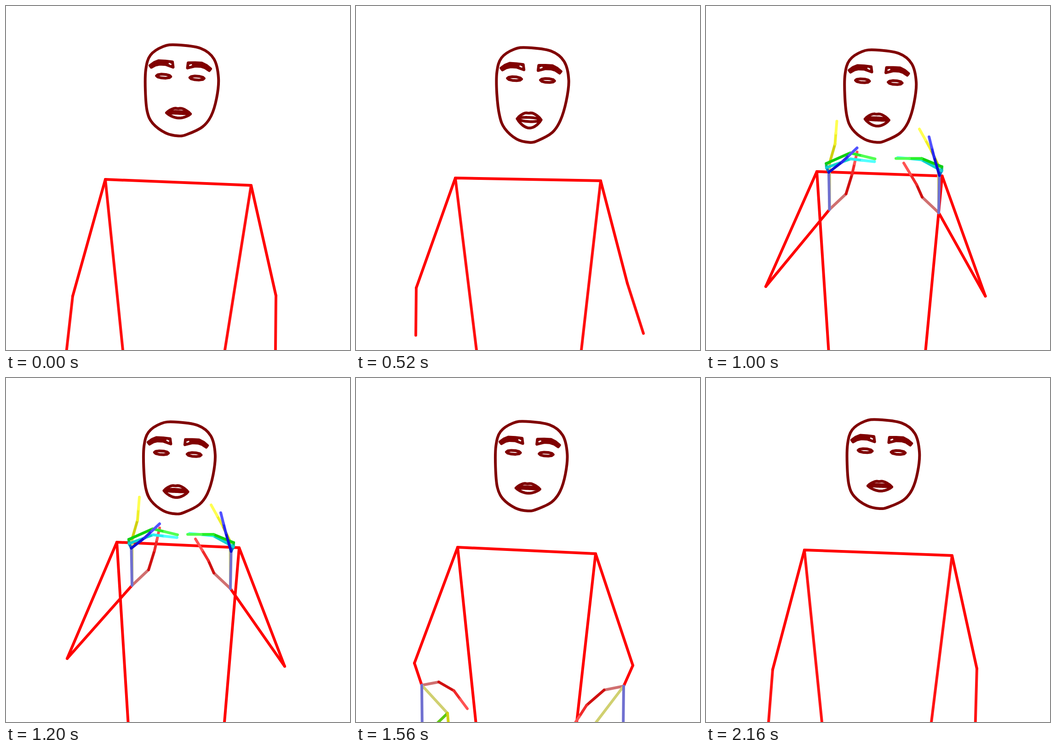
An HTML page for the animation above (2200 ms loop, 748 px wide and 748 px high).

```html
<!DOCTYPE html>
<html lang="en">
<head>
<meta charset="utf-8">
<title>Signing pose</title>
<style>
html, body { margin: 0; width: 100%; height: 100%; overflow: hidden; background: #fff; }
svg { display: block; width: 100vw; height: 100vh; }
path { fill: none; stroke-width: 6; stroke-linecap: round; stroke-linejoin: round; }
</style>
</head>
<body>
<svg id="stage" viewBox="0 0 748 748"></svg>
<script>
const LOOP = 2200, STEP = 40, HANDS_FROM = 640;
const DARK = '#800000';
const stage = document.getElementById('stage');

// Key poses. head: centre x, nod, chin drop, mouth opening.
// torso: left and right shoulder, x of both hip lines at the lower edge.
// arms: elbow and wrist, left then right. lowered: how far the hands hang.
// ease: exponent for the arms on the way to the next pose.
const poses = [
  { at: 0, ease: 3, head: [382.5, 0, 0, 0], torso: [216, 377, 533, 390, 254, 476],
    arms: [145, 631, 120, 852, 587, 630, 585, 852], lowered: 1, pale: 15 },
  { at: 520, ease: .9, head: [384, 6, 14, 1], torso: [216, 374, 532, 380, 262, 490],
    arms: [131, 613, 130, 716, 590, 603, 625, 712], lowered: 1, pale: 15 },
  { at: 800, ease: 1, head: [381.5, 11, 15, .5], torso: [241, 363, 520, 370, 267.5, 480],
    arms: [127, 610, 263, 434, 609, 635, 524, 441], lowered: 0, pale: 0 },
  { at: 1200, ease: 2, head: [377, 11, 13, .4], torso: [241, 357, 507, 369, 265.5, 475],
    arms: [133, 610, 274, 451, 606, 627, 488, 458], lowered: 0, pale: 0 },
  { at: 1560, ease: 1, head: [381.3, 10, 6.5, 0], torso: [221, 368, 521, 382, 260.5, 480],
    arms: [127, 620, 143, 668, 602, 625, 582, 670], lowered: 1, pale: 0 },
  { at: 1720, ease: 1, head: [384.5, 8, 3, 0], torso: [213, 372, 531, 388, 260.5, 490],
    arms: [119, 618, 110, 850, 598.5, 628, 607, 850], lowered: 1, pale: 5 },
  { at: 2160, ease: 1, head: [385.5, 6, 1.5, 0], torso: [214, 374, 535, 386, 252, 490],
    arms: [145, 634, 128, 850, 589, 632, 583, 850], lowered: 1, pale: 20 }
];

// Face at rest; the brow is one half, measured from the nose line.
const NOSE = 379, ROLL = .055;
const oval = [[371, 84.5], [423, 92], [452, 115], [462, 156], [458, 200], [446, 239],
  [427, 263], [394, 279], [375, 282.5], [347, 276], [319, 255], [307, 229], [303, 184],
  [304, 138], [314, 107], [342, 88]];
const brow = [[17, 122.5], [32, 121.5], [47, 121.5], [57, 126], [66, 133],
  [63, 137], [54, 131.5], [45, 129], [32, 129], [15.5, 134]];

// Hand points relative to the wrist, x towards the body; thumb to little finger.
const knuckles = {
  raised: [[36, -34], [.5, -102], [-7, -100], [-6.5, -91], [-1.5, -81]],
  lowered: [[37, -7], [56, 61], [28, 88], [14, 98], [1, 104]]
};
const leftHand = { side: 1, reach: 1, droop: 0, // bend and tip of each finger
  fingers: [[49, -76, 60, -125], [12, -142, 16, -192], [45, -123, 99, -110],
    [46, -110, 98, -104], [27, -103, 60, -134]] };
const rightHand = { side: -1, reach: 1.15, droop: .42,
  fingers: [[48, -61, 76, -108], [17, -137, 42, -182], [37, -118, 93, -118],
    [37, -115, 89, -120], [10, -121, 21, -165]] };

const mix = (a, b, k) => a + (b - a) * k;
const mixAll = (a, b, k) => a.map((v, i) => mix(v, b[i], k));
const clamp = v => Math.min(1, Math.max(0, v));
const range = (n, f) => Array.from({ length: n }, (_, i) => f(i));

function poseAt(t) {
  const i = poses.findLastIndex(p => p.at <= t);
  const a = poses[i], b = poses[i + 1] || a;
  const k = a === b ? 0 : (t - a.at) / (b.at - a.at), eased = k ** a.ease;
  return {
    head: mixAll(a.head, b.head, k),
    torso: mixAll(a.torso, b.torso, k),
    arms: mixAll(a.arms, b.arms, eased),
    lowered: mix(a.lowered, b.lowered, eased),
    pale: mix(a.pale, b.pale, k)
  };
}

const xy = p => p.map(v => v.toFixed(1)).join();
const line = points => 'M' + points.map(xy).join('L');
function smoothLoop(points) {
  const n = points.length, at = i => points[(i + n) % n];
  const handle = (i, s) => at(i).map((v, j) => v + s * (at(i + 1)[j] - at(i - 1)[j]) / 6);
  return 'M' + xy(at(0)) + range(n, i =>
    'C' + [handle(i, 1), handle(i + 1, -1), at(i + 1)].map(xy).join(' ')).join('') + 'Z';
}

function add(tag, attributes = {}, parent = stage) {
  const node = document.createElementNS(stage.namespaceURI, tag);
  for (const name in attributes) node.setAttribute(name, attributes[name]);
  return parent.appendChild(node);
}
const stroke = (color, parent) => add('path', { stroke: color }, parent);
const draw = (path, d) => path.setAttribute('d', d);

// Bones join joint 0 (the wrist) and joints 1 to 20, four to a finger.
function handBones() {
  const hues = ['100', '110', '010', '011', '001'];
  const tone = (f, on, off) => `rgb(${[...hues[f]].map(c => +c ? on : off)})`;
  const roots = [0, 1, 4].map(f => [0, 4 * f + 1, tone(f, 208, 112)]);
  const palm = [[5, 9, '#60c810'], [9, 13, '#10b870'], [13, 17, '#1070c0']];
  const fingers = [0, 1, 3, 2, 4].flatMap(f =>
    [[208, 16], [240, 42], [255, 82]].map(([on, off], i) =>
      [4 * f + 1 + i, 4 * f + 2 + i, tone(f, on, off)]));
  return [...roots, ...palm, ...fingers];
}
const bones = handBones();

const face = stroke(DARK), lips = stroke(DARK);
const sides = [-1, 1].map(side => ({
  side,
  eye: stroke(DARK),
  brow: add('path', { stroke: DARK, style: `fill:${DARK}` }),
  notch: add('path', { stroke: '#fff', style: 'stroke-width:3' })
}));
const hips = [stroke('#f00'), stroke('#f00')];
const forearms = [stroke('#f00'), stroke('#f00')];
const upperArms = stroke('#f00');
const hands = [leftHand, rightHand].map(shape => {
  const group = add('g');
  return { shape, group, paths: bones.map(b => stroke(b[2], group)) };
});

function drawFace([cx, nod, chin, open]) {
  const eyes = nod * .9, jaw = Math.max(0, chin - eyes);
  const scale = (159 - nod * .3) / 159; // a nodding head looks narrower
  const place = ([x, y]) => {
    const u = clamp((y - 155) / 127);
    const pull = 1 - jaw * .03 * u * u * (1 - u);
    const shift = y < 155 ? mix(nod, eyes, (y - 85) / 70) : mix(eyes, chin, u ** 1.6);
    return [cx + (x - 382.5) * scale * pull, y + shift];
  };
  draw(face, smoothLoop(oval.map(place)));

  for (const s of sides) {
    const half = points => points.map(([x, y]) =>
      place([NOSE + s.side * x, y + s.side * x * ROLL]));
    const lens = range(10, i => {
      const a = i * Math.PI / 5;
      return [36.3 + 15.5 * Math.cos(a), 154.6 + 4.2 * Math.sin(a)];
    });
    draw(s.eye, line(half(lens)) + 'Z');
    draw(s.brow, line(half(brow)) + 'Z');
    draw(s.notch, line(half([[20.5, 128], [24, 126.5]])));
  }

  const mouthY = 233.5 + nod * .15 + chin * .85;
  const arc = (height, power, dip = 0) => line(range(17, i => {
    const u = i / 16;
    const v = Math.sin(Math.PI * u) ** power - dip * Math.exp(-(((u - .48) / .09) ** 2));
    return [cx - 7.5 + 52 * (u - .5), mouthY + 2.5 * (u - .5) + height * v];
  }));
  draw(lips, arc(-12 - 3 * open, .8, .12) + arc(10 + 9 * open, .8) +
    arc(-4, .5) + arc(5 * open * open, .5));
}

function drawHand({ shape, group, paths }, [wx, wy], lowered, visible) {
  group.setAttribute('display', visible ? 'inline' : 'none');
  const { side, reach, droop, fingers } = shape;
  const joints = [[wx, wy]];
  fingers.forEach(([bx, by, tx, ty], f) => {
    const [hx, hy] = knuckles.lowered[f];
    const hang = f ? [hx, hy, hx + 3, hy + 35, hx + 4, hy + 75] : [hx, hy, 70, 12, 99, 51];
    const low = hang.map((v, i) => i % 2 ? v + droop * hang[i - 1] : v * reach);
    const [kx, ky, mx, my, ex, ey] =
      mixAll([...knuckles.raised[f], bx, by, tx, ty], low, lowered);
    for (const [x, y] of [[kx, ky], [mx, my], [mix(mx, ex, .48), mix(my, ey, .48)], [ex, ey]])
      joints.push([wx + side * x, wy + y]);
  });
  bones.forEach(([a, b], i) => draw(paths[i], line([joints[a], joints[b]])));
}

function render(time) {
  let t = Math.floor((time % LOOP) / STEP) * STEP;
  if (t === STEP) t = 0; // the opening pose holds for two steps

  const { head, torso, arms, lowered, pale } = poseAt(t);
  const [lx, ly, rx, ry, lh, rh] = torso;
  const shoulders = [[lx, ly], [rx, ry]];
  const elbows = [arms.slice(0, 2), arms.slice(4, 6)];
  const wrists = [arms.slice(2, 4), arms.slice(6, 8)];

  drawFace(head);
  draw(upperArms, line([elbows[0], ...shoulders, elbows[1]]));
  [lh, rh].forEach((hx, i) => {
    draw(hips[i], line([shoulders[i], mixAll(shoulders[i], [hx, 748], 1.05)]));
    draw(forearms[i], line([elbows[i], wrists[i]]));
    for (const path of [hips[i], forearms[i]])
      path.setAttribute('stroke', `rgb(255,${pale | 0},${pale | 0})`);
    drawHand(hands[i], wrists[i], lowered, t >= HANDS_FROM);
  });
}

const start = performance.now();
function tick() {
  render(performance.now() - start);
  requestAnimationFrame(tick);
}
tick();
</script>
</body>
</html>
```
